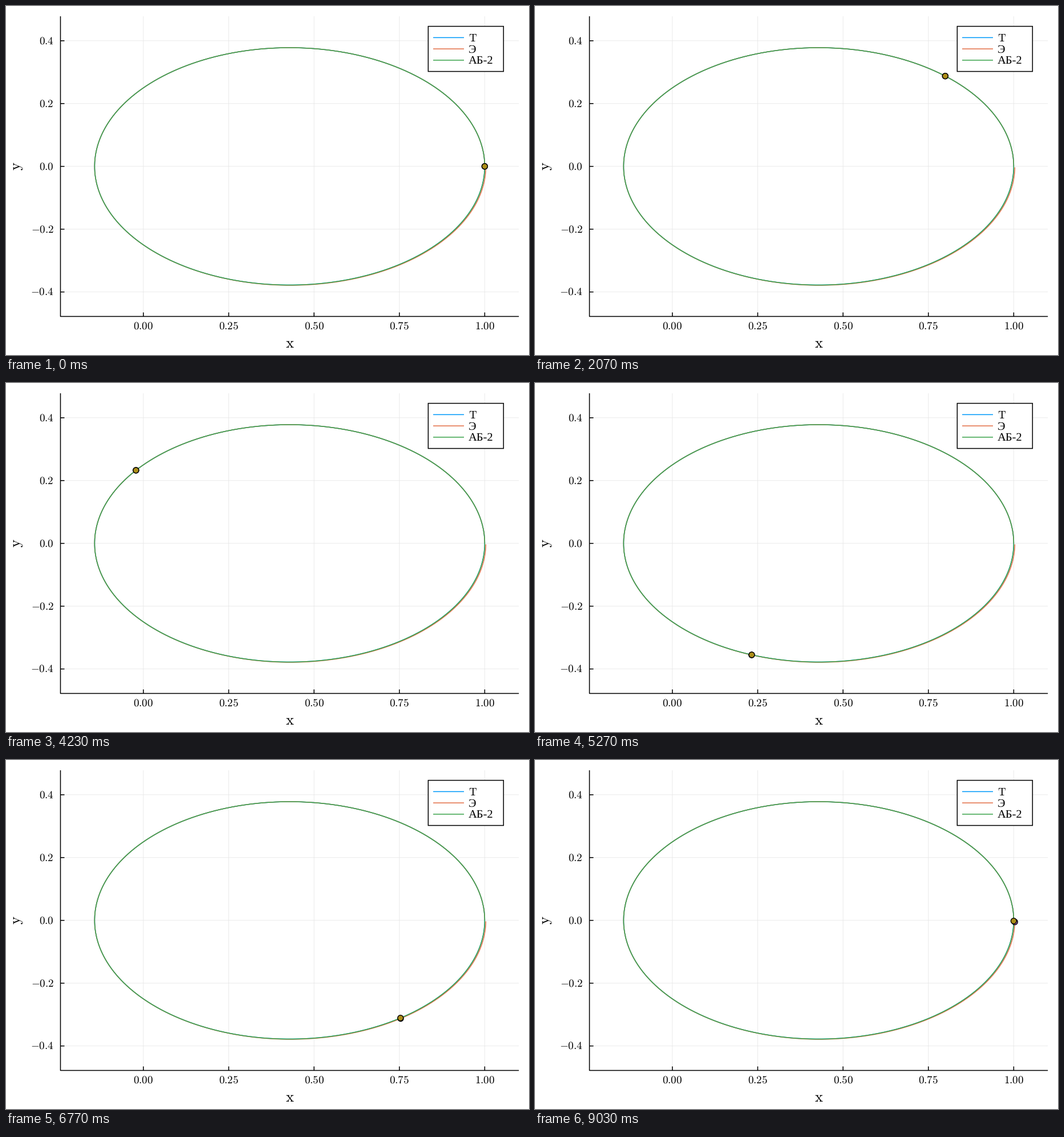
Write a matplotlib script that moves like this. It is 917x611 px and loops after 9.06 s.

```python
import matplotlib.pyplot as plt
import numpy as np
from matplotlib.animation import FuncAnimation
from matplotlib.patches import Circle, Rectangle

W, H, DPI = 917, 611, 100
PT = 72 / DPI  # points per pixel

BLUE, ORANGE, GREEN = "#009afa", "#e36f47", "#3da44d"
PURPLE, GOLD = "#c371d2", "#ac8e18"

plt.rcParams.update({"mathtext.fontset": "cm", "text.hinting": "none"})

# Kepler orbit started at its far point (1, 0) with speed 0.5
A, ECC = 4 / 7, 0.75
B = A * np.sqrt(1 - ECC**2)
T_END = 2.714
STEP = 1e-5


def exact_orbit(t):
    mean = np.pi + t / A**1.5
    anom = mean.copy()
    for _ in range(60):
        f = anom - ECC * np.sin(anom) - mean
        anom -= f / (1 - ECC * np.cos(anom))
    return A * (ECC - np.cos(anom)), -B * np.sin(anom)


def euler_orbit(steps, keep):
    z, v = 1 + 0j, 0.5j
    path = [z]
    for i in range(1, steps + 1):
        z, v = z + STEP * v, v - STEP * z / abs(z) ** 3
        if i % keep == 0:
            path.append(z)
    path = np.array(path)
    return path.real, path.imag


# Plot area in pixels and its data limits
LEFT, RIGHT, TOP, BOTTOM = 95.5, 899.2, 18.0, 543.5
X0, X1 = A * (ECC - 1) - 0.1, 1.1
Y0, Y1 = -B - 0.1, B + 0.1


def px(x):
    return LEFT + (x - X0) / (X1 - X0) * (RIGHT - LEFT)


def py(y):
    return BOTTOM - (y - Y0) / (Y1 - Y0) * (BOTTOM - TOP)


fig = plt.figure(figsize=(W / DPI, H / DPI), dpi=DPI, facecolor="white")
ax = fig.add_axes([0, 0, 1, 1])
ax.set(xlim=(0, W), ylim=(H, 0))
ax.axis("off")


def line(xs, ys, color="black", width=1.53, z=2):
    ax.plot(xs, ys, color=color, lw=width * PT, zorder=z, snap=False,
            solid_capstyle="butt", solid_joinstyle="round")


def label(x, y, s, size=19.1, ha="center", **kw):
    ax.text(x, y, s, fontsize=size * PT, ha=ha, va="baseline", zorder=6, **kw)


def roman(s):
    return rf"$\mathrm{{{s}}}$"


# Grid, ticks and axes
for v in (0, 0.25, 0.5, 0.75, 1):
    x = px(v)
    line([x, x], [TOP, BOTTOM], "#e6e6e6", 0.8, 1)
    line([x, x], [BOTTOM, BOTTOM - 7])
    label(x, 567, f"${v:.2f}$")
for v in (-0.4, -0.2, 0, 0.2, 0.4):
    y = py(v)
    line([LEFT, RIGHT], [y, y], "#e6e6e6", 0.8, 1)
    line([LEFT, LEFT + 7], [y, y])
    label(83.8, y + 6.4, f"${v:.1f}$", ha="right")
line([LEFT, LEFT, RIGHT], [TOP, BOTTOM, BOTTOM])
label((LEFT + RIGHT) / 2, 598, roman("x"), 26.3)
label(25, (TOP + BOTTOM) / 2, roman("y"), 26.3,
      rotation=90, rotation_mode="anchor")

# Orbits
KEEP = 100
t = np.arange(0, T_END + KEEP * STEP / 2, KEEP * STEP)
exact = exact_orbit(t)
euler = euler_orbit(round(T_END / STEP), KEEP)
for (x, y), color in ((exact, BLUE), (euler, ORANGE), (exact, GREEN)):
    line(px(x), py(y), color, z=3)

# Legend
BOX_X, BOX_Y, BOX_W, BOX_H = 740.3, 35.6, 132, 79
ax.add_patch(Rectangle((BOX_X, BOX_Y), BOX_W, BOX_H, fc="white", ec="black",
                       lw=1.53 * PT, zorder=5, snap=False))
entries = ((roman("T"), BLUE), ("Э", ORANGE), ("АБ-2", GREEN))
for i, (name, color) in enumerate(entries):
    y = BOX_Y + BOX_H * (i + 1) / 4
    line([749, 803], [y, y], color, z=6)
    label(811, y + 6.6, name, 19.1 if i == 0 else 20.5, "left",
          family="Liberation Serif")


def dot(color, z):
    c = Circle((px(1), py(0)), 4.95, fc=color, ec="black", lw=1.4 * PT, zorder=z)
    return ax.add_patch(c)


dots = ((dot(PURPLE, 7), euler), (dot(GOLD, 8), exact))

FRAMES, INTERVAL = 302, 30
PER_STEP = 10  # stored points per 0.01 of orbit time


def update(i):
    # 30 orbit steps per second on a 30 ms clock
    n = (9 * i + 7) // 10 * PER_STEP
    for d, (x, y) in dots:
        d.center = px(x[n]), py(y[n])
    return [d for d, _ in dots]


anim = FuncAnimation(fig, update, frames=FRAMES, interval=INTERVAL,
                     repeat=True, repeat_delay=0, blit=False)
plt.show()
```
